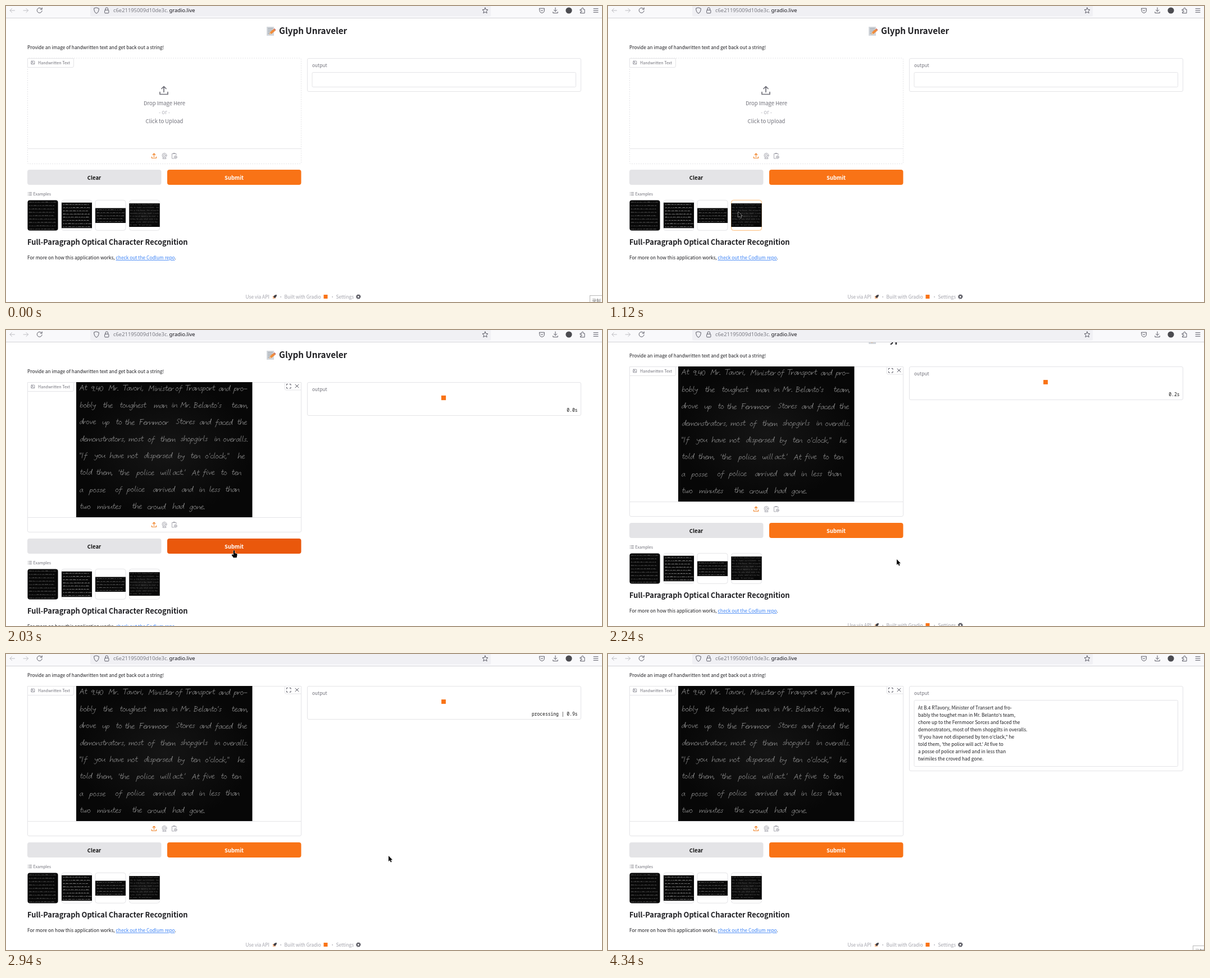
An HTML page that plays this animation: 1061 px wide and 528 px high, repeating every 4550 ms.

```html
<!DOCTYPE html>
<html lang="en">
<head>
<meta charset="utf-8">
<title>Handwriting demo</title>
<style>
html, body { margin: 0; width: 100%; height: 100%; overflow: hidden; background: #fff; }
svg { display: block; width: 100vw; height: 100vh; }
text { font: 8.35px "Noto Sans CJK SC", "Noto Sans CJK JP", "Noto Sans", sans-serif; fill: #1d1d21; white-space: pre; }
text.s { font-size: 7.1px; }
text.l { font-size: 9.47px; }
text.b { font-weight: 600; }
text.mid { text-anchor: middle; }
text.url { font: 9.4px "Noto Sans", "Open Sans", sans-serif; }
text.mono { font: 500 8px "Noto Sans Mono", "DejaVu Sans Mono", monospace; text-anchor: end; fill: #111; }
.mut { fill: #71717a; }
.dim { fill: #a1a1aa; }
.link { fill: #3b82f6; text-decoration: underline; }
.box { fill: #fff; stroke: #e4e4e7; }
.ico { fill: none; stroke: #5b5b66; stroke-linecap: round; stroke-linejoin: round; }
.pen { fill: none; stroke-linecap: round; stroke-linejoin: round; }
</style>
</head>
<body>
<svg viewBox="0 0 1061 528" preserveAspectRatio="none">
  <defs>
    <radialGradient id="paper"><stop offset="0" stop-color="#151515"/><stop offset="1" stop-color="#070707"/></radialGradient>
    <g id="note">
      <rect width="313.5" height="241" fill="url(#paper)" stroke="none"/>
      <g id="ink" class="pen"/>
    </g>
    <g id="tray"><path d="M0 3V-7M-4-3L0-7L4-3M-7 3V7H7V3"/></g>
    <g id="tools">
      <use href="#tray" class="ico" transform="translate(263.5 267.2) scale(.58)" style="stroke:#f07f22;stroke-width:1.9"/>
      <g class="ico" style="stroke:#a1a1aa;stroke-width:.9">
        <circle cx="282" cy="266.5" r="4"/><circle cx="282" cy="266.5" r="1.9"/><path d="M280 270L279 272.4H285L284 270"/>
        <path d="M299 272H295.5V263.5H303V266M297.5 263.5V262.5H301V263.5"/><circle cx="301.8" cy="269.7" r="2.5"/><path d="M300.8 269.7H303M301.8 268.7V271"/>
      </g>
    </g>
  </defs>
  <rect width="1061" height="528" fill="#fff"/>

  <g id="page">
    <g transform="translate(463 36)">
      <path d="M1 1H14V17H1Z" fill="#d3d7dc"/>
      <path d="M3 4H12M3 7H11M3 10H8M3 13H7" stroke="#929aa3"/>
      <path d="M5.5 14.5L7 10.5L13.5 5L16.5 8L9.5 14Z" fill="#ef8b3c"/>
      <path d="M13.5 5L15 4L17.5 6.8L16.5 8Z" fill="#c9665c"/><path d="M5.5 14.5L7 10.5L9.5 14Z" fill="#e8c39a"/>
    </g>
    <text class="b" x="486" y="50" style="font-size:15.2px">Glyph Unraveler</text>
    <text x="38" y="77">Provide an image of handwritten text and get back out a string!</text>

    <g id="empty">
      <rect class="box" x="38.5" y="93" width="487" height="188.5" rx="2.5" stroke-dasharray="2 2"/>
      <path d="M39 254.5H525" stroke="#e4e4e7"/>
      <use href="#tray" class="ico" x="281" y="150.5" style="stroke:#71717a;stroke-width:1.7"/>
      <text class="l mid mut" x="282" y="177">Drop Image Here</text>
      <text class="l mid" x="282" y="193" style="fill:#b4b4bc">- or -</text>
      <text class="l mid mut" x="282" y="209">Click to Upload</text>
      <use href="#tools"/>
    </g>

    <g id="loaded">
      <rect class="box" x="38.5" y="93.5" width="487" height="267" rx="2.5"/>
      <use href="#note" x="125" y="93" stroke="#909090" stroke-width=".85"/>
      <path d="M39 334.5H525" stroke="#e4e4e7"/>
      <path class="box" d="M496.5 93.5V105Q496.5 107 498.5 107H525.5V93.5Z"/>
      <path class="ico" d="M499.5 98.5V96.5H501.5M505 96.5H507V98.5M507 102V104H505M501.5 104H499.5V102M515 97L521 103M521 97L515 103"/>
      <use href="#tools" y="80"/>
    </g>

    <path class="box" d="M38.5 93.5H120.5V107Q120.5 109.5 118 109.5H38.5Z"/>
    <g class="ico" style="stroke:#85858e;stroke-width:.8"><rect x="44.8" y="98.2" width="6" height="5.6" rx=".8"/><path d="M45 103L48 100.7L50.6 103.4"/><circle cx="46.5" cy="99.9" r=".4"/></g>
    <text class="s mut" x="57" y="103.7">Handwritten Text</text>

    <g id="lower">
      <rect x="38" y="292" width="238.5" height="27" rx="4" fill="#e4e4e7"/>
      <text class="l b mid" x="157" y="309.7" style="fill:#111">Clear</text>
      <rect id="submit" x="287" y="292" width="238.5" height="27" rx="4" fill="#f97316"/>
      <text class="l b mid" x="406" y="309.7" style="fill:#fff">Submit</text>
      <path class="ico" d="M39.3 332.6h.3M39.3 335h.3M39.3 337.4h.3M41.3 332.6H45.5M41.3 335H45.5M41.3 337.4H45.5" style="stroke:#71717a;stroke-width:.8"/>
      <text class="s mut" x="48.5" y="337.8">Examples</text>
      <g id="thumbs"></g>
      <use href="#note" stroke="#6a6a6a" stroke-width="1.5" transform="translate(219.5 352.2) scale(.1722 .173)"/>
      <text class="b" x="38" y="426" style="font-size:12.85px">Full-Paragraph Optical Character Recognition</text>
      <text x="38" y="452">For more on how this application works, <tspan class="link">check out the Codlum repo</tspan>.</text>
    </g>

    <g id="footer">
      <text class="dim" x="426.5" y="522">Use via API</text>
      <g transform="translate(478.5 518.5) rotate(45)">
        <path d="M0-4.8Q3-2 1.8 2H-1.8Q-3-2 0-4.8Z" fill="#3f3f46"/><path d="M-1.8 0L-3.4 3L-1.6 2ZM1.8 0L3.4 3L1.6 2ZM-1.2 2.4H1.2L0 5Z" fill="#f97316"/>
      </g>
      <text class="dim" x="485" y="522">·</text>
      <text class="dim" x="495.5" y="522">Built with Gradio</text>
      <rect x="565.5" y="515" width="7" height="7" fill="#f97316"/>
      <text class="dim" x="577" y="522">·</text>
      <text class="dim" x="587.5" y="522">Settings</text>
      <g fill="none" stroke="#52525b"><circle cx="627.3" cy="518.6" r="3.6" stroke-width="1.5" stroke-dasharray="1.5 1.327"/><circle cx="627.3" cy="518.6" r="2.4" stroke-width="1.7"/></g>
    </g>

    <rect id="panel" class="box" x="536.5" y="93.5" width="487" rx="2.5"/>
    <text class="mut" x="545" y="109.3">output</text>
    <rect id="field" class="box" x="545" y="118.5" width="469.5" rx="2"/>
    <g id="wait">
      <rect id="spin" x="-4" y="-4" width="8" height="8" fill="#f97316"/>
      <text id="timer" class="mono" x="1017.5" y="145.6"></text>
    </g>
    <g id="result"></g>
  </g>

  <rect width="1061" height="21" fill="#f9f9fb"/>
  <path d="M0 21.5H1061" stroke="#d3d3d8"/>
  <path d="M150 0H863V16Q863 18.5 860.5 18.5H152.5Q150 18.5 150 16Z" fill="#f0f0f4"/>
  <g class="ico" style="stroke:#bdbdc2"><path d="M15.5 8H7M10.5 4.5L7 8L10.5 11.5M31 8H39.5M36 4.5L39.5 8L36 11.5"/></g>
  <g class="ico">
    <path d="M63.6 5.4A4.5 4.5 0 1 0 64.2 8.6M64.2 3V6H61.2"/>
    <path d="M161 3L165.3 4.4Q165.5 11 161 13.3Q156.5 11 156.7 4.4Z"/>
    <rect x="175.7" y="7.2" width="7.2" height="5.6" rx="1"/><path d="M177 7V5.2A2.3 2.3 0 0 1 181.6 5.2V7"/>
    <path d="M853 3L854.5 6.4L858 6.7L855.3 9.1L856.2 12.7L853 10.8L849.8 12.7L850.7 9.1L848 6.7L851.5 6.4Z"/>
    <path d="M949.8 4.2H958.4V8A4.3 4.3 0 0 1 949.8 8ZM952 7L954.1 9L956.2 7"/>
    <path d="M978 3V9.5M975.3 7L978 9.7L980.7 7M973.8 10.5V12.5H982.2V10.5"/>
    <path d="M1022.5 6H1025V4.6A1.4 1.4 0 0 1 1027.8 4.6V6H1030V12.8H1022.5V10.8H1024A1.3 1.3 0 0 0 1024 8.2H1022.5Z"/>
    <path d="M1046 4.7H1054M1046 8H1054M1046 11.3H1054"/>
  </g>
  <circle cx="1002" cy="8" r="5.6" fill="#4b4b50"/>
  <text class="url" x="191" y="11.4" style="fill:#7b7b83">c6e21195009d10de3c.</text>
  <text class="url" x="290.5" y="11.4" style="fill:#15141a">gradio.live</text>

  <g id="tip">
    <rect x=".5" y=".5" width="30" height="20" fill="#fff" stroke="#b9b9b9"/>
    <text x="4" y="12.5" style="font-size:8px;fill:#777">录制</text>
  </g>
  <g id="cursor" fill="#000" stroke="#fff" stroke-width=".9" stroke-linejoin="round" paint-order="stroke">
    <path id="arrow" d="M0 0V10L2.3 7.8L3.9 11.4L5.6 10.7L4 7.2H7Z"/>
    <path id="hand" d="M-1.2 1Q0-.8 1.2 1V5L4.6 5.9Q5.8 6.3 5.6 8L4.6 13H-1.2L-4.2 8.6Q-4.4 7-2.8 7.2L-1.2 8.6Z"/>
  </g>
</svg>
<script>
const $ = id => document.getElementById(id);
const show = (id, on) => $(id).style.display = on ? '' : 'none';
const move = (id, x, y) => $(id).setAttribute('transform', `translate(${x} ${y})`);

// Single-stroke handwriting: letter, advance, path with the baseline at 0.
const letters = {};
`a 6.5 M5-6C1-8-1-1 1 0C3 1 5-4 5-6Q4 0 6 0
b 6 M1-12L0-1C4 1 6-4 4-6Q2-7 0-3
c 5.5 M4.5-5.5C3-8-1-5 0-2Q1 1 5-1
d 6.5 M5-6C1-8-1-1 1 0C3 1 5-5 6-12Q4-1 6 0
e 5.5 M0-3C5-4 5-7 3-7C0-6-1 0 2 0Q4 0 5-1
f 5.5 M5-11C3-14 2-9 2-3L0 5M0-5L5-6
g 6.5 M5-6C1-8-1-1 1 0C3 1 5-4 5-6L4 3C3 7-1 6 0 4
h 6.5 M1-12L0 0C1-4 4-8 5-5L4.5-1Q5 0 6 0
i 3.5 M1-6L.5-1Q1 0 2 0M1.5-9v.6
k 6 M1-12L0 0M5-6L1-3L5 0
l 3.5 M1.5-12L.5-2Q1 0 2 0
m 9.5 M0-6L0 0Q3-8 4-5L4 0Q7-8 8-5L8-1Q8 0 9 0
n 6.5 M0-6L0 0Q4-8 5-5L5-1Q5 0 6 0
o 6 M3-6.5C-1-7-1 0 2 0C6 0 5-7 2-6
p 6 M1-6L-1 6M0-3C3-8 6-6 4-2Q2 1 0-1
r 5 M0-6L0 0Q1-6 4-6
s 5 M4-6Q1-7 1-5Q4-3 3-1Q2 1 0-1
t 4.7 M2-11L1-2Q2 1 4-1M0-7L4-7.5
u 6.5 M0-6C-1 1 2 1 5-6Q4 0 6 0
v 5.5 M0-6L2 0L5-6.5
w 8 M0-6Q0 1 3-1L4-5Q3 1 6-1L7-6
y 6 M0-6Q0-1 4-4L5-6L3 3Q1 7-1 4
A 8.5 M0 0L4-11L7 0M1-4L6-5
B 7.5 M1-11L0 0M0-11C8-11 5-6 1-6C8-6 6 1 0 0
F 6.5 M1-11L0 0M0-11L6-11.5M0-6L4-6.5
I 4 M1-11L0 0
M 10 M0 0L2-11L4-4L8-11L8 0
S 6.5 M6-10C3-13-1-8 3-6C6-4 4 1 0-1
T 7 M0-11L8-11.5M4-11L3 0
0 7 M3-10C-1-10-1 0 2 0C6 0 6-10 3-10
4 6.5 M1-10L0-4L6-5M5-9L4 0
9 6 M5-9C1-13-1-5 2-6Q4-6 5-9L4 0
. 3 M0-.3h1.2
, 3 M1-1L0 2
' 2.5 M1-11L.5-8
" 4 M0-11L0-8M2-11L2-8
- 6 M0-4h5`.split('\n').forEach(row => {
  const [ch, adv, ...d] = row.split(' ');
  letters[ch] = { adv: +adv, d: d.join(' ') };
});

// Each word follows its left edge.
const lines = [
  `6 At 26 9.40 58 Mr. 83 Tavori, 129 Minister 177 of 194 Transport 254 and 281 pro-`,
  `7 bobly 48 the 78 toughest 139 man 170 in 186 Mr. 210 Belanto's 277 team,`,
  `6 drove 47 up 71 to 87 the 113 Fernmoor 178 Stores 220 and 248 faced 287 the`,
  `7 demonstrators, 94 most 128 of 150 them 186 shopgirls 246 in 262 overalls.`,
  `6 "If 33 you 60 have 92 not 121 dispersed 181 by 204 ten 230 o'clock," 288 he`,
  `7 told 36 them, 75 'the 108 police 150 will 172 act.' 206 At 226 five 258 to 277 ten`,
  `6 a 24 posse 70 of 91 police 137 arrived 188 and 219 in 237 less 266 than`,
  `7 two 38 minutes 100 the 127 crowd 172 had 202 gone.`
];
let seed = 7;
const rnd = () => (seed = seed * 16807 % 2147483647) / 2147483647;

const WIDE = 1.03;
let ink = '';
lines.forEach((line, i) => {
  const parts = line.split(' ');
  for (let k = 0; k < parts.length; k += 2) {
    let x = +parts[k];
    const y = 15 + 30.1 * i + rnd() * 1.6 - .8;
    for (const ch of parts[k + 1]) {
      ink += `<path transform="translate(${x.toFixed(1)} ${y.toFixed(1)}) skewX(-6) scale(${WIDE} .82)" d="${letters[ch].d}"/>`;
      x += letters[ch].adv * WIDE;
    }
  }
});
$('ink').innerHTML = ink;

function scribble(x, y, w, h, rows) {
  let d = '';
  for (let r = 0; r < rows; r++) {
    let px = x + 2.5;
    while (px < x + w - 6) {
      const n = 2 + Math.floor(rnd() * 5);
      d += `M${px.toFixed(1)} ${(y + (r + .65) * h / rows).toFixed(1)}`;
      for (let k = 0; k < n; k++) d += `q.3-${(.7 + rnd() * 1.3).toFixed(1)} .9 0`;
      px += n * .9 + 1.7;
    }
  }
  return d;
}

// x, image top, image height, rows, ink colour
const thumbs = [[38.5, 346.5, 54, 9, '#888'], [99, 350.7, 45.5, 8, '#ddd'], [159, 360.5, 26.5, 5, '#999'], [219.5, 352, 42, 0, '#000']];
$('thumbs').innerHTML = thumbs.map(([x, y, h, rows, color], i) =>
  `<rect class="box" id="thumb${i}" x="${x}" y="346.3" width="54" height="54" rx="4"/>` +
  `<rect x="${x}" y="${y}" width="54" height="${h}" rx="${i ? 0 : 4}" fill="#080808"/>` +
  `<path class="pen" stroke="${color}" stroke-width=".45" d="${scribble(x, y, 54, h, rows)}"/>`).join('');

$('result').innerHTML = [
  'At B.4 RTavory, Minister of Transert and fro-',
  "bably the toughet man in Mr. Belanto's team,",
  'chore up to the Fernmoor Sorces and faced the',
  'demonstrators, most of them shopgilts in overalls.',
  `'If you have not dispersed by ten o'clack," he`,
  "told them, 'the police will act.' At five to",
  'a posse of police arrived and in less than',
  'twimiles the croved had gone.'
].map((s, i) => `<text x="552" y="${134.5 + 13.1 * i}">${s}</text>`).join('');

const LOOP = 4550, LOAD = 1220, RUN = 2030, CUT = 3440, DONE = 4340;

// time, x, y of the pointer
const pointer = [
  [390, 832, 498], [500, 770, 466], [600, 610, 425], [700, 425, 392], [810, 292, 376], [910, 240, 369], [1010, 233, 367], [1120, 232, 367],
  [1420, 246, 370], [1520, 284, 379], [1620, 330, 387], [1720, 371, 391], [1830, 398, 393], [1930, 406, 393],
  [2140, 430, 402], [2240, 514, 409], [2340, 622, 384], [2440, 681, 360]
];
const scrolls = [[0, 0], [2140, 14], [2240, 28], [2340, 33], [2440, 35], [2540, 36]];
const held = (table, t) => table.filter(row => row[0] <= t).pop();

function draw(t) {
  const loaded = t >= LOAD, waiting = t >= RUN && t < DONE, done = t >= DONE;
  const scroll = held(scrolls, t)[1];
  show('empty', !loaded);
  show('loaded', loaded);
  move('page', 0, -scroll);
  move('lower', 0, loaded ? 80 : 0);
  move('footer', 0, loaded ? 36 : 0);

  const at = t < CUT && held(pointer, t);
  const hover = t >= 1520 && t < 2240;
  show('cursor', at);
  if (at) move('cursor', at[1], at[2]);
  show('arrow', !hover);
  show('hand', hover);
  $('submit').setAttribute('fill', hover ? '#ea580c' : '#f97316');
  $('thumb3').style.stroke = t >= 910 && !loaded ? '#fdba74' : '';

  show('wait', waiting);
  show('result', done);
  show('field', !waiting);
  $('panel').setAttribute('height', done ? 151 : 59);
  $('field').setAttribute('height', done ? 118 : 26);
  if (waiting) {
    const secs = t < CUT ? (t - RUN) / 1000 : 50 + (t - 3640) / 1000;
    const label = (Math.floor(secs * 10 + .001) / 10).toFixed(1) + 's';
    $('timer').textContent = (t < 2340 ? '' : 'processing | ') + label;
    const size = .95 + .08 * Math.cos((t - RUN) / 180);
    $('spin').setAttribute('transform', `translate(779 121) scale(${size})`);
  }

  show('tip', t < 100 || t >= CUT);
  if (t < 100) move('tip', 1039, 516);
  else move('tip', 1041, 520);
}

const start = performance.now();
function tick() {
  draw((performance.now() - start) % LOOP);
  requestAnimationFrame(tick);
}
tick();
</script>
</body>
</html>
```
